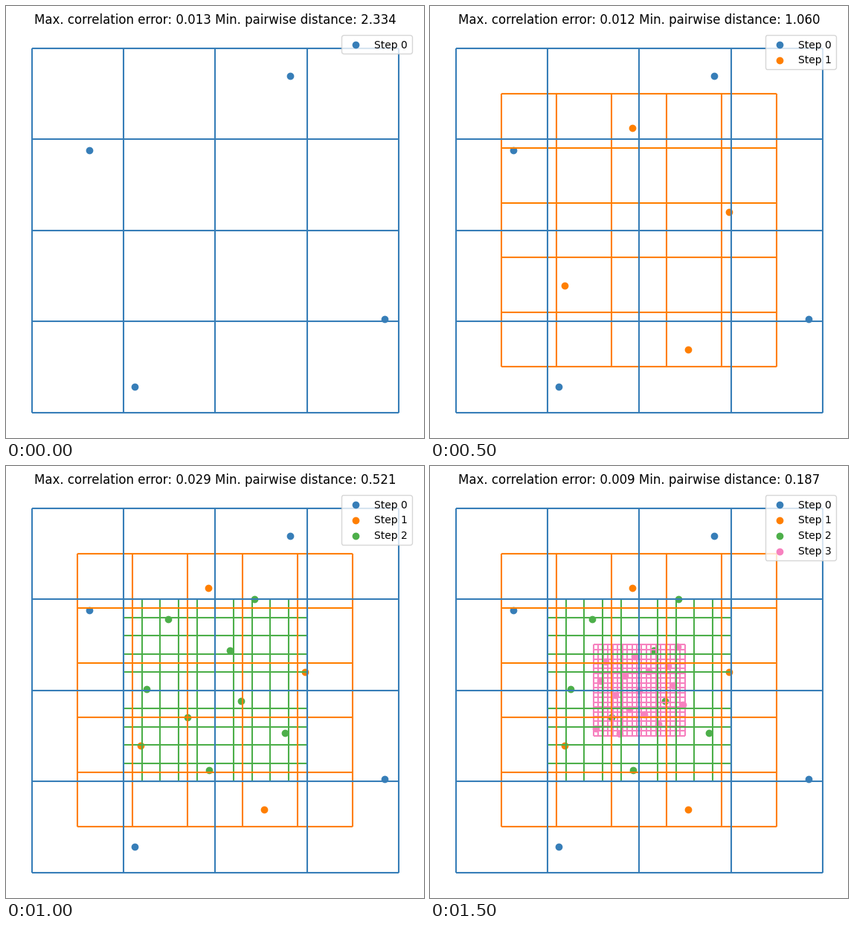
Recreate the animation shown at these times as a matplotlib script. Size 562 by 581 pixels, loop 2 s.

```python
import numpy as np
import matplotlib.pyplot as plt
from matplotlib.animation import FuncAnimation

W, H, DPI = 562, 581, 100
LEFT, TOP, AX_W, AX_H = 10, 32, 542.5, 539
CENTER = np.array([LEFT + AX_W / 2, TOP + AX_H / 2])
HALF = np.array([AX_W, AX_H]) / 2.2

N_STEPS = 4
COLORS = [plt.cm.Set1(i) for i in (1, 4, 2, 7)]
ERRORS = [0.013, 0.012, 0.029, 0.009]
DISTANCES = [2.334, 1.060, 0.521, 0.187]

# Coarse samples; the sample count doubles with every step
COARSE = np.array([
    (112, 194), (382, 94), (509, 421), (173, 512),
    (272, 164), (402, 277), (181, 376), (347, 462),
    (334, 179), (218, 206), (301, 248), (189, 300),
    (316, 316), (244, 338), (375, 359), (273, 409),
])
# Row taken by each free column of the finest Latin square, left to right
ROWS = [17, 7, 3, 10, 18, 6, 13, 2, 9, 14, 5, 16, 4, 8, 0, 12]


def half_size(step):
    return HALF * (1 - step / N_STEPS)


def inside(points, step):
    return points[np.all(abs(points - CENTER) < half_size(step) + 1, axis=1)]


def latin_fill(points, rows, step):
    """Put one new sample at a cell centre in every column still free."""
    taken = inside(points, step)
    low = CENTER - half_size(step)
    cell = 2 * half_size(step) / (len(taken) + len(rows))
    used = ((taken - low) // cell)[:, 0]
    free = np.setdiff1d(np.arange(len(taken) + len(rows)), used)
    return low + cell * (np.column_stack([free, rows]) + 0.5)


POINTS = np.vstack([COARSE, latin_fill(COARSE, ROWS, N_STEPS - 1)])

plt.rcParams["font.family"] = "DejaVu Sans"
fig = plt.figure(figsize=(W / DPI, H / DPI), dpi=DPI, facecolor="white")
ax = fig.add_axes([LEFT / W, (H - TOP - AX_H) / H, AX_W / W, AX_H / H])


def draw_step(step):
    end = 4 * 2 ** step
    start = end // 2 if step else 0
    color = COLORS[step]

    # one grid cell per sample inside; coarser grids lie on top
    cells = len(inside(POINTS[:end], step))
    (x0, y0), (x1, y1) = CENTER - half_size(step), CENTER + half_size(step)
    style = dict(colors=[color], lw=1.5, zorder=3 - 0.1 * step)
    ax.vlines(np.linspace(x0, x1, cells + 1), y0, y1, **style)
    ax.hlines(np.linspace(y0, y1, cells + 1), x0, x1, **style)
    ax.scatter(*POINTS[start:end].T, color=color, zorder=1, label=f"Step {step}")


def update(last):
    ax.clear()
    ax.axis("off")
    for step in range(last + 1):
        draw_step(step)
    ax.set_xlim(LEFT, LEFT + AX_W)
    ax.set_ylim(TOP + AX_H, TOP)
    ax.set_title(f"Max. correlation error: {ERRORS[last]:.3f} "
                 f"Min. pairwise distance: {DISTANCES[last]:.3f}", fontsize=12)
    legend = ax.legend(loc="upper right", fontsize=10)
    for label in legend.get_texts():
        label.set_y(-1)  # sit one pixel lower
    return []


anim = FuncAnimation(fig, update, frames=N_STEPS, interval=500,
                     repeat=True, repeat_delay=0)
plt.show()
```
